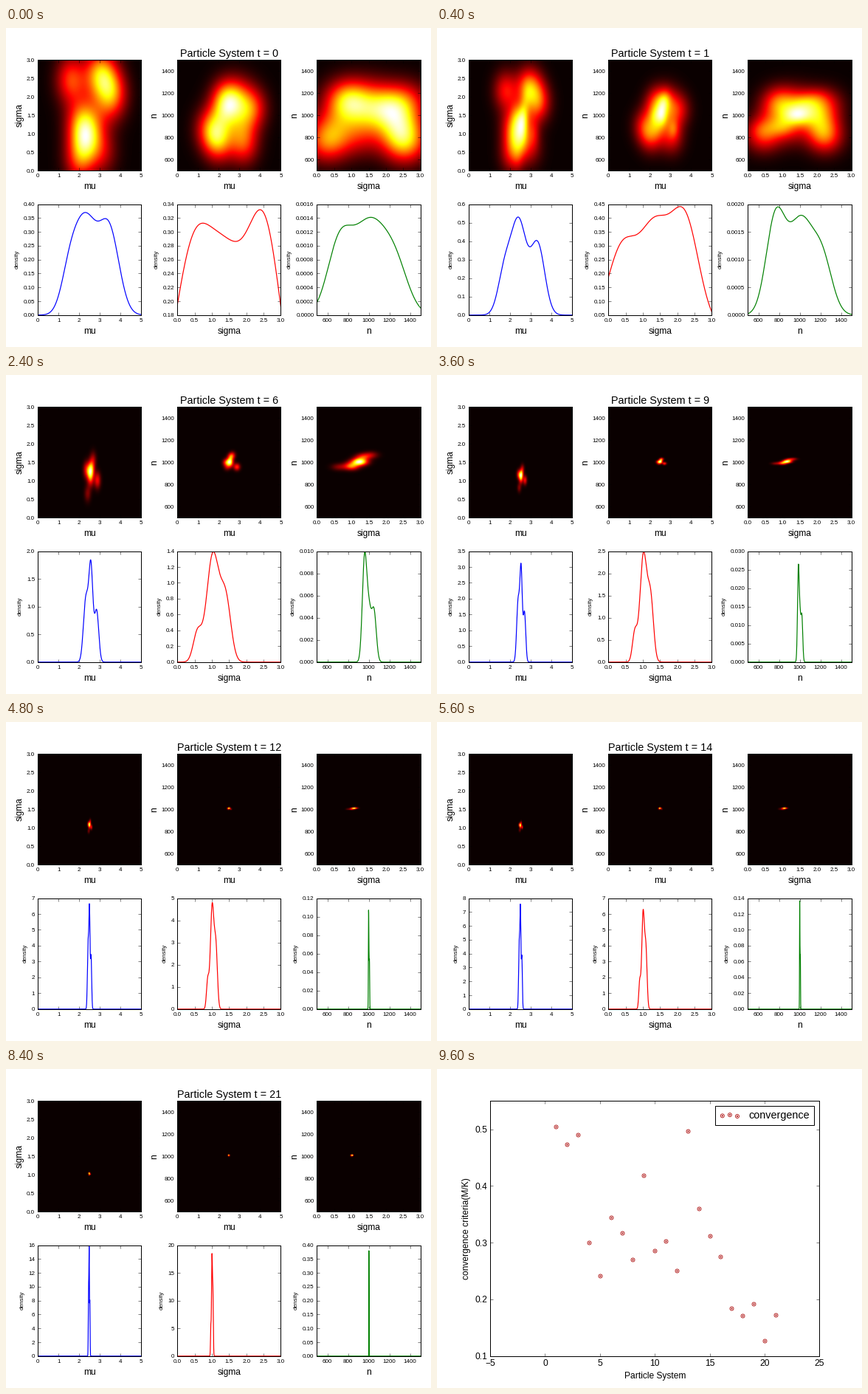
A matplotlib script that plays this animation: 576 px wide and 432 px high, repeating every 10000 ms.

```python
import numpy as np
import matplotlib.pyplot as plt
from matplotlib.animation import FuncAnimation

plt.rcParams.update({
    "font.family": "Liberation Sans", "font.size": 12,
    "axes.linewidth": 1.0, "axes.labelpad": 5, "axes.titlepad": 4,
    "axes.titlesize": 14.4, "patch.linewidth": 1.0,
    "xtick.direction": "in", "ytick.direction": "in",
    "xtick.top": True, "ytick.right": True,
    "xtick.major.size": 4, "ytick.major.size": 4,
    "xtick.major.width": 0.5, "ytick.major.width": 0.5,
    "xtick.major.pad": 4, "ytick.major.pad": 4,
})

SYSTEMS, FRAMES, STEP_MS = 22, 25, 400
NAMES = ("mu", "sigma", "n")
PAIRS = ((0, 1), (0, 2), (1, 2))
COLORS = "brg"
RANGE = ((0, 5), (0, 3), (500, 1500))
TICKS = (np.arange(6), np.arange(0, 3.1, 0.5), np.arange(600, 1401, 200))

# Both stages are reached at SETTLED; later systems only shrink to TRUTH.
SETTLED = 3
TRUTH = np.array([2.47, 1.0, 1003])

# Highest density of each variable at a few systems
KEY_T = (0, SETTLED, 9, 12, 17, 21)
PEAKS = ((.37, 1.09, 3.12, 6.65, 9.2, 15.8),
         (.332, .78, 2.49, 4.8, 9.45, 18.5),
         (.00141, .00374, .0265, .107, .197, .38))

# Three bumps per variable: heights, centres, widths
WIDE = np.array([
    [(.13, .333, .3), (1.53, 2.31, 3.45), (.4, .54, .48)],
    [(.275, .19, .3), (.49, 1.5, 2.52), (.58, .5, .5)],
    [(.88, 1.33, .5), (710, 1010, 1270), (115, 175, 120)],
])
SETTLED_BUMPS = np.array([
    [(.68, 1, .55), (2.22, 2.63, 3.1), (.2, .165, .17)],
    [(.2, .74, .42), (.25, 1.05, 1.72), (.22, .32, .27)],
    [(3.6, 1.5, 1.75), (890, 1005, 1130), (58, 55, 60)],
])

# Particle clouds: (mu, sigma, n, weight), one common width per variable
WIDE_CLOUD = np.array([
    (2.35, .9, 1130, 1.2), (2.3, 1.4, 1000, .5), (3.6, 2.05, 1060, .95),
    (3.2, 2.55, 730, .85), (1.6, 2.45, 880, .9), (2.0, .3, 750, .8),
    (2.8, 2.6, 1120, .6), (3.1, .5, 900, .5), (3.1, 1.6, 1200, .25),
    (1.9, 1.3, 800, .4),
])
WIDE_WIDTH = np.array([.5, .45, 130])
SETTLED_CLOUD = np.array([
    (2.57, 1.38, 1000, 1), (2.25, 1.5, 980, .55), (2.8, 2.0, 1160, .35),
    (3.15, 1.0, 870, .6), (2.6, 1.0, 925, .4), (2.35, .35, 870, .3),
    (2.65, 1.6, 1110, .6),
])
SETTLED_WIDTH = np.array([.18, .27, 58])

CONVERGENCE = (.505, .474, .49, .3, .2415, .345, .3178, .27, .4185, .2865,
               .303, .2505, .4975, .36, .312, .2755, .184, .172, .192,
               .127, .173)


def bell(x, centre, width):
    return np.exp(-0.5 * ((x - centre) / width) ** 2)


def peak(var, t):
    return np.exp(np.interp(t, KEY_T, np.log(PEAKS[var])))


def spread(var, t):
    """Width relative to the settled system."""
    return min(1, PEAKS[var][1] / peak(var, t))


def density(var, t, x):
    heights, centres, widths = SETTLED_BUMPS[var]
    scale = spread(var, t)
    late = np.array([heights / heights.max(),
                     TRUTH[var] + (centres - TRUTH[var]) * scale,
                     widths * scale])
    early = WIDE[var].copy()
    early[0] /= early[0].max()
    u = min(t / SETTLED, 1)
    rows = early ** (1 - u) * late ** u
    y = sum(h * bell(x, c, w) for h, c, w in rows.T)
    return y * peak(var, t) / y.max()


def cloud_heat(cloud, width, pair, cells=100):
    i, j = pair
    x, y = (np.linspace(*RANGE[v], cells) for v in pair)
    wx = max(width[i], 0.4 * (x[1] - x[0]))
    wy = max(width[j], 0.4 * (y[1] - y[0]))
    z = sum(p[3] * np.outer(bell(y, p[j], wy), bell(x, p[i], wx))
            for p in cloud)
    return z / z.max()


def heat(pair, t):
    u = min(t / SETTLED, 1)
    scale = np.array([spread(v, t) for v in range(3)])
    late = SETTLED_CLOUD.copy()
    late[:, :3] = TRUTH + (late[:, :3] - TRUTH) * scale
    z = u * cloud_heat(late, SETTLED_WIDTH * scale, pair)
    if u < 1:
        # The wide cloud tightens while it fades
        shrink = (1 - u) + u * 0.4
        early = WIDE_CLOUD.copy()
        early[:, :3] = TRUTH + (early[:, :3] - TRUTH) * shrink
        z = z + (1 - u) * cloud_heat(early, WIDE_WIDTH * shrink, pair)
    return z / z.max()


def nice_ticks(low, high):
    """Round limits with at most nine steps of 1, 2 or 5."""
    power = np.floor(np.log10(high - low)) - 1
    for step in (m * 10 ** p for p in (power, power + 1) for m in (1, 2, 5)):
        first, last = np.floor(low / step), np.ceil(high / step)
        if last - first <= 9:
            return np.arange(first, last + 1) * step


fig = plt.figure(figsize=(8, 6), dpi=72, facecolor="white")
grid = fig.add_gridspec(2, 3, left=0.075, right=0.975, bottom=0.1, top=0.9,
                        wspace=0.35, hspace=0.3)
images, lines, panels = [], [], []

for col, (i, j) in enumerate(PAIRS):
    ax = fig.add_subplot(grid[0, col])
    images.append(ax.imshow(heat((i, j), 0), cmap="hot", vmin=0, vmax=1,
                            origin="lower", aspect="auto",
                            interpolation="bilinear",
                            extent=RANGE[i] + RANGE[j]))
    ax.set(xlabel=NAMES[i], xticks=TICKS[i], yticks=TICKS[j])
    ax.set_ylabel(NAMES[j], labelpad=3)
    panels.append(ax)
title = panels[1].set_title("")

for var, name in enumerate(NAMES):
    ax = fig.add_subplot(grid[1, var])
    lines += ax.plot([], [], color=COLORS[var], lw=1.2)
    ax.set(xlabel=name, xlim=RANGE[var], xticks=TICKS[var])
    ax.set_ylabel("density", fontsize=8)
    panels.append(ax)

for ax in panels:
    ax.tick_params(labelsize=8)

summary = fig.add_axes([0.125, 0.1, 0.775, 0.8])

number = np.arange(1, SYSTEMS)
wobble = np.random.default_rng(4).normal(0, 0.03, number.size)
PLOTS = [
    (0.22 * np.exp(-number / 5), "tolerance", "tolerance",
     np.arange(0, 0.26, 0.05), (0, 0.25)),
    (0.1 + 0.6 * np.exp(-number / 9) + wobble, "acceptance rate",
     "acceptance", np.arange(0, 1.1, 0.2), (0, 1)),
    (CONVERGENCE, "convergence criteria(M/K)", "convergence",
     np.arange(0.1, 0.51, 0.1), (0.1, 0.55)),
]


def draw_systems(t):
    title.set_text(f"Particle System t = {t}")
    for pair, image in zip(PAIRS, images):
        image.set_data(heat(pair, t))
    for var, line in enumerate(lines):
        x = np.linspace(*RANGE[var], 1001)
        y = density(var, t, x)
        line.set_data(x, y)
        ticks = nice_ticks(y.min(), y.max())
        line.axes.set_yticks(ticks)
        line.axes.set_ylim(ticks[0], ticks[-1])


def draw_summary(values, ylabel, label, ticks, limits):
    summary.clear()
    ring = summary.scatter(number, values, s=25, facecolor="white",
                           edgecolor="#b01818", linewidths=0.9)
    dot = summary.scatter(number, values, s=5, color="#b01818", linewidths=0)
    summary.set(xlim=(-5, 25), ylim=limits, yticks=ticks,
                xticks=np.arange(-5, 26, 5),
                xlabel="Particle System", ylabel=ylabel)
    summary.legend([(ring, dot)], [label], loc="upper right",
                   scatterpoints=3, fontsize=14.4, fancybox=False,
                   edgecolor="k", framealpha=1)


def update(i):
    running = i < SYSTEMS
    for ax in panels:
        ax.set_visible(running)
    summary.set_visible(not running)
    if running:
        draw_systems(i)
    else:
        draw_summary(*PLOTS[i - SYSTEMS])
    return []


anim = FuncAnimation(fig, update, frames=FRAMES, interval=STEP_MS,
                     init_func=lambda: update(0), repeat=True,
                     repeat_delay=0, blit=False)
plt.show()
```
